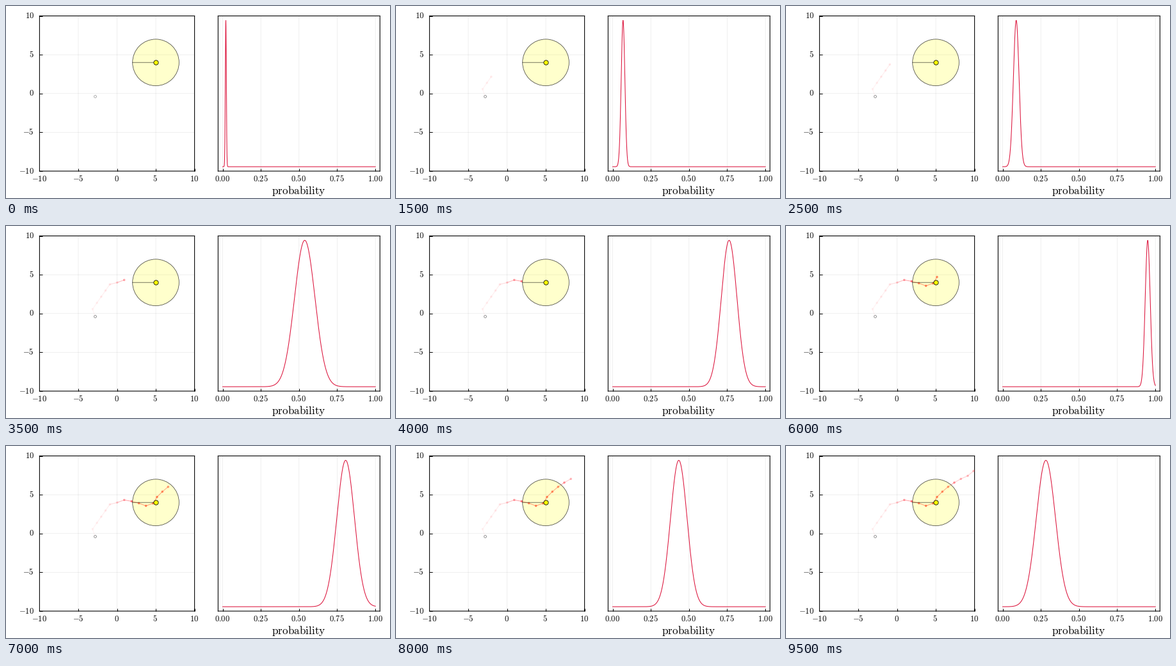
Write a matplotlib script that moves like this. It is 600 px wide and 300 px high and loops after 10 s.

```python
import numpy as np
import matplotlib.pyplot as plt
from matplotlib.animation import FuncAnimation
from matplotlib.collections import LineCollection
from matplotlib.patches import Circle

plt.rcParams["mathtext.fontset"] = "cm"

WIDTH, HEIGHT, DPI = 600, 300, 100
PX = 72 / DPI
FRAMES, INTERVAL = 20, 500
TOP, BOTTOM = 15.5, 258
CRIMSON = "#dc143c"
TARGET, REACH = (5, 4), 3
ORIGIN, STRIDE = (-2.87, -0.35), 0.97

steps = np.arange(FRAMES)

# The walker takes equal strides; only its heading turns at a few steps
heading = np.radians(np.interp(steps[1:], [1, 2, 5, 6, 7, 8, 10, 12, 13, 17, 18],
                               [107, 55, 55, 14, 20, -10, -20, 58, 45, 24, 40]))
strides = STRIDE * np.column_stack([np.cos(heading), np.sin(heading)])
path = np.vstack([ORIGIN, ORIGIN + np.cumsum(strides, axis=0)])

# The estimate drifts on the log-odds scale, with a slowly varying uncertainty
log_odds = np.interp(steps, [1, 3, 5, 7, 10, 11, 14, 16, 19],
                     [-3.86, -2.62, -2.33, .15, 3.2, 3.7, 1.42, -.27, -.93])
mean = 1 / (1 + np.exp(-log_odds))
noise = np.interp(steps, [1, 3, 7, 14, 16, 19], [.17, .19, .27, .37, .22, .31])
spread = noise * mean * (1 - mean)

fig = plt.figure(figsize=(WIDTH / DPI, HEIGHT / DPI), dpi=DPI, facecolor="white")


def make_panel(left, right, xlim, ylim, xticks, yticks):
    ax = fig.add_axes([left / WIDTH, 1 - BOTTOM / HEIGHT,
                       (right - left) / WIDTH, (BOTTOM - TOP) / HEIGHT])
    ax.set(xlim=xlim, ylim=ylim, xticks=xticks, yticks=yticks)
    ax.tick_params(direction="in", length=4.5 * PX, width=PX,
                   labelbottom=False, labelleft=False)
    ax.grid(color="black", alpha=0.1, linewidth=0.6 * PX)
    ax.set_axisbelow(True)
    for spine in ax.spines.values():
        spine.set_linewidth(1.1 * PX)
    for artist in ax.findobj():
        artist.set_snap(False)
    return ax


def label(x, baseline, text, size=12.6, ha="center"):
    fig.text(x / WIDTH, 1 - baseline / HEIGHT, f"${text}$", fontsize=size * PX,
             ha=ha, va="baseline")


def dot_area(diameter):
    return (diameter * PX) ** 2


def fade(values, gain):
    rgba = np.tile([1.0, 0.1, 0.15, 1.0], (len(values), 1))
    rgba[:, 3] = .04 + gain * values
    return rgba


ticks = [-10, -5, 0, 5, 10]
fractions = [0, .25, .5, .75, 1]
field = make_panel(52.4, 294.6, (-10, 10), (-10, 10), ticks, ticks)
chart = make_panel(331.4, 584.3, (-.03, 1.03), (-.03, 1.03), fractions, [])

for value in ticks:
    label(172.8 + 12.1 * value, 273.7, value)
    label(43.9, 140.5 - 12.125 * value, value, ha="right")
for value in fractions:
    label(338 + 238.7 * value, 273.7, f"{value:.2f}")
label(457.5, 293.6, r"\mathrm{probability}", 17.3)

trail = LineCollection([], linewidths=PX, zorder=3)
field.add_collection(trail)
dots = field.scatter([], [], s=dot_area(3.6), linewidths=0, zorder=4)
origin = field.scatter(*ORIGIN, s=dot_area(3.8), facecolors="white",
                       edgecolors="black", linewidths=0.6 * PX, zorder=5, snap=False)

field.add_patch(Circle(TARGET, REACH, facecolor=(1, 1, 0, .2),
                       edgecolor=(0, 0, 0, .7), linewidth=0.8 * PX, zorder=6))
field.plot([TARGET[0] - REACH, TARGET[0]], [TARGET[1]] * 2,
           color=(0, 0, 0, .6), linewidth=0.9 * PX, zorder=7, snap=False)
field.scatter(*TARGET, s=dot_area(7.2), facecolors="yellow",
              edgecolors="black", linewidths=0.8 * PX, zorder=8, snap=False)

xs = np.linspace(0, 1, 1201)
curve, = chart.plot([], [], color=CRIMSON, linewidth=1.05 * PX, zorder=3, snap=False)


def update(step):
    seen = mean[1:step + 1]
    trail.set_segments([path[i:i + 2] for i in range(step)])
    trail.set_color(fade(seen, .5))
    dots.set_offsets(path[1:step + 1])
    dots.set_facecolor(fade(seen, .6))
    origin.set_alpha(.65 if step else .5)
    curve.set_data(xs, np.exp(-((xs - mean[step]) / spread[step]) ** 2 / 2))
    return trail, dots, origin, curve


animation = FuncAnimation(fig, update, frames=FRAMES, interval=INTERVAL,
                          repeat=True, repeat_delay=0, blit=False)
plt.show()
```
